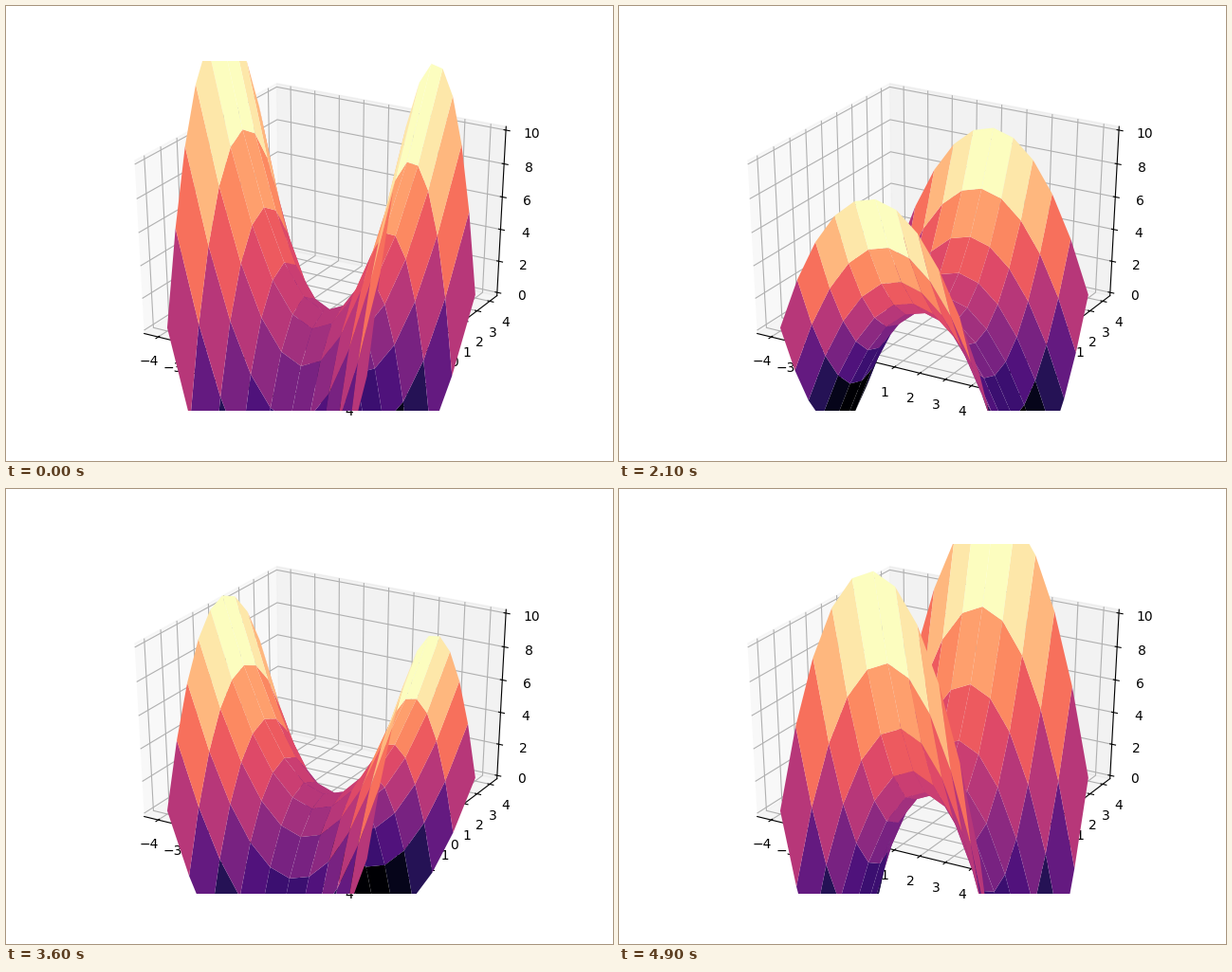
A matplotlib script for the animation above (5 s loop, 640 px wide and 480 px high).

```python
import numpy as np
import matplotlib.pyplot as plt
from matplotlib.animation import FuncAnimation

FRAMES = 50
INTERVAL = 100
HALF_WIDTH = 4.4
HEIGHT = 10
PAD = 1 / 48  # margin of the drawn box on each side

fig = plt.figure(figsize=(6.4, 4.8), dpi=100)
ax = fig.add_subplot(projection="3d")

# A unit cube stretched over the full, non-square subplot area.
ax.apply_aspect = lambda position=None: None
ax.set_box_aspect((1, 1, 1), zoom=np.sqrt(3) / 1.8294640721620434)
ax.view_init(elev=30, azim=-60)

side = HALF_WIDTH * (1 + 2 * PAD)
ax.set_xlim(-side, side)
ax.set_ylim(-side, side)
ax.set_zlim(-HEIGHT * PAD, HEIGHT * (1 + PAD))
ax.set_xticks(range(-4, 5))
ax.set_yticks(range(-4, 5))
ax.set_zticks(range(0, 11, 2))

axis_points = np.linspace(-4, 4, 11)
X, Y = np.meshgrid(axis_points, axis_points)
SADDLE = X**2 - Y**2


def amplitude(frame):
    return 0.99 * np.cos(0.2 * frame - 0.1)


def update(frame):
    for surface in list(ax.collections):
        surface.remove()
    return [ax.plot_surface(X, Y, amplitude(frame) * SADDLE, cmap="magma")]


anim = FuncAnimation(fig, update, frames=FRAMES, interval=INTERVAL,
                     repeat=True, repeat_delay=0, blit=False)
plt.show()
```
